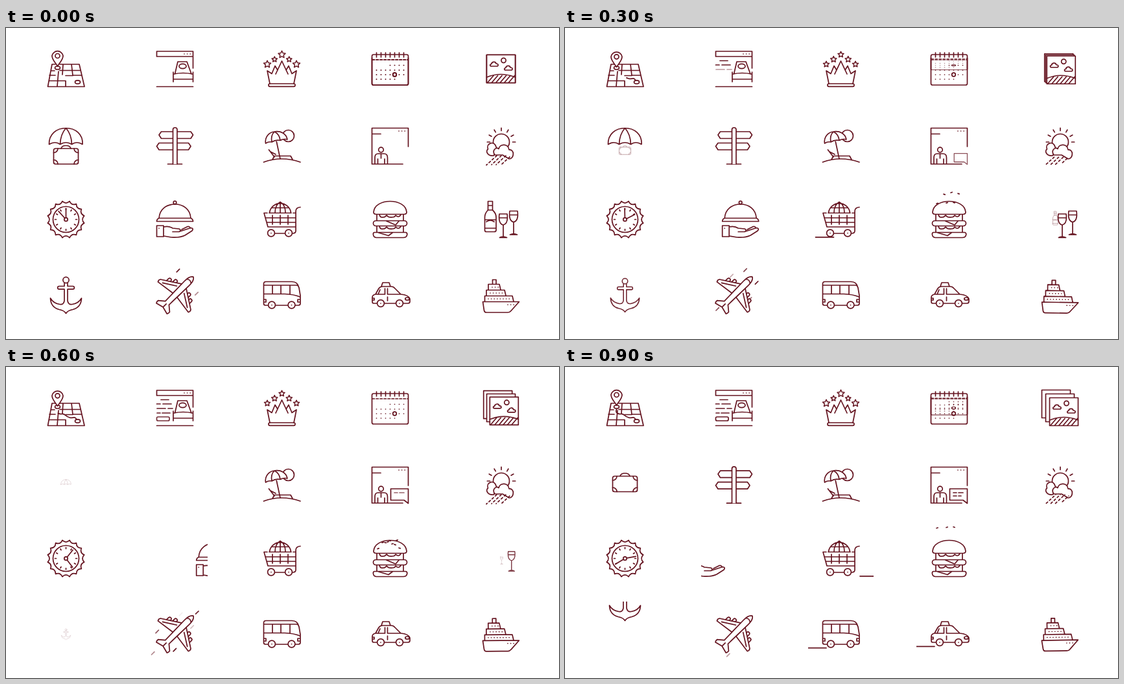
Write an HTML page that moves like this. It is 853x480 px and loops after 960 ms.

```html
<!DOCTYPE html>
<html lang="en">
<head>
<meta charset="utf-8">
<title>Travel icons</title>
<style>
  html, body { margin: 0; width: 100%; height: 100%; overflow: hidden; background: #fff; }
  #stage { display: block; width: 853px; height: 480px; }
  .ink { fill: none; stroke: #651420; stroke-width: 1.7; stroke-linecap: round; stroke-linejoin: round; }
  .solid { fill: #fff; }
  .dots { stroke-dasharray: 0 4.6; }
  .days { stroke-dasharray: 0 7; }
</style>
</head>
<body>
<svg id="stage" class="ink" viewBox="0 0 853 480">
  <defs>
    <g id="wheel" class="solid"><circle r="5.4"/><path d="M0 0V.1"/></g>
    <path id="cloud" d="M-4 4C-7 4 -7 .5 -4 .5C-4 -3 2 -4 3 0C7 0 7 4 4 4Z"/>
    <path id="glass" d="M761 287H773Q775 302 767 304Q759 302 761 287ZM761 293H773M767 304V323M761.5 323.5Q767 320.5 772.5 323.5Z"/>
    <rect id="photo" class="solid" x="741.5" y="41.5" width="44" height="43"/>
    <path id="dash" d="M0 0H28"/>
    <g id="wing">
      <path d="M25 -3V-9A2.5 2.5 0 0 0 20 -9V-6M17 -8V-14A2.5 2.5 0 0 0 12 -14V-11"/>
      <path d="M4.5 -18L33 .5Q35 3 33 6L4.5 2ZM8 -10L27 2"/>
    </g>
  </defs>

  <!-- map -->
  <path d="M76 56H71L64.5 90.5H121L113 56H83M69 66H75M83 65.5H115M67 73H76M88 56L87 72M101 56L103 73H117M81 67L79 90M66 81.5H92V90M92 73.5H103"/>
  <ellipse cx="79.5" cy="61.5" rx="4" ry="2.5"/>
  <path id="route" stroke-linecap="butt" pathLength="1" stroke-dasharray="1 2" d="M109 81C106 75 103 80 98 78C91 76 92 72 86 72.5C80 73 77 69 80 64.5"/>
  <ellipse class="solid" cx="110.5" cy="83.5" rx="4" ry="2.6"/>
  <g id="pin" class="solid"><path d="M79.5 59C76 53 71 49 71 43A8.6 8.6 0 0 1 88 43C88 49 83 53 79.5 59Z"/><circle cx="79.5" cy="43" r="3.5"/></g>

  <!-- hotel page -->
  <path d="M232.5 44V36H288.5V62M232.5 44H288.5M232.5 90.5H288.5"/>
  <path class="dots" d="M275 40H285"/>
  <path d="M258 68V83M288.5 68V83M258 79H288.5M260.5 71L265 52H279L286 71M259 71Q273 68 288 71"/>
  <ellipse cx="272.5" cy="59" rx="5.5" ry="3.6"/>
  <g id="copy">
    <path d="M239 50.5H251"/>
    <path d="M232.5 57H238M242 57H255"/>
    <path d="M233 64H246M250 64H257"/>
    <path d="M233 71H238M241 71H253"/>
    <rect x="232.5" y="77" width="19.5" height="6" rx="2"/>
  </g>

  <!-- crown -->
  <path d="M407 86L403 66L410 70.5L415 58.5L419 65M416 71L425.5 51L435 71M432 65L436 58.5L441 70.5L448 66L444 86"/>
  <rect x="405" y="86" width="41" height="4.3" rx="2"/>
  <g id="stars"></g>

  <!-- calendar -->
  <rect x="564.5" y="41" width="56" height="47" rx="2.5"/>
  <path id="rings"/>
  <g id="page">
    <path d="M565 49H620" stroke-dasharray="3.5 2.5"/>
    <path class="days" d="M592.5 57.5H614M571.5 65H614M571.5 72H593M606.5 72H614M571.5 79H600"/>
    <circle cx="599.5" cy="72" r="2.8"/>
  </g>
  <g id="leaf"><use href="#page"/><path d="M564.5 46V86Q564.5 88 567 88H618Q620.5 88 620.5 86V46"/></g>

  <!-- photos -->
  <use id="back" href="#photo"/>
  <use href="#photo"/>
  <g id="front">
    <use href="#photo"/>
    <circle cx="767.5" cy="50" r="3.6"/>
    <use href="#cloud" x="753" y="55"/><use href="#cloud" x="775" y="61"/>
    <path d="M741.5 76Q763 67 785.5 76"/>
    <path id="hatch"/>
  </g>

  <!-- umbrella and suitcase -->
  <path id="brolly" d="M66.5 179.5C66 164 78 154.5 92.5 154.5S119 164 118 179.5Q109 174 101.5 179.5Q92.5 174 83.5 179.5Q76 174 66.5 179.5ZM83.5 179.5Q84 164 92.5 154.5Q101 164 101.5 179.5"/>
  <g id="bag"><rect x="73.5" y="186" width="38" height="24" rx="3"/><path d="M85 186Q86 181.5 92.5 181.5T100 186M80 186A6.5 6.5 0 0 1 73.5 192.5M105 186A6.5 6.5 0 0 0 111.5 192.5M80 210A6.5 6.5 0 0 0 73.5 203.5M105 210A6.5 6.5 0 0 1 111.5 203.5"/></g>

  <!-- signpost -->
  <svg x="210" y="132" width="101" height="100" viewBox="210 132 101 100"><g id="post">
    <path d="M236 165L239.5 160H285L288.5 165L285 170.5H239.5ZM232.5 182.5L236 177.5H281.5L285 182.5L281.5 188H236ZM249.5 210H271.5"/>
    <path class="solid" d="M257.5 210V157A3.2 3.2 0 0 1 264 157V210"/>
  </g></svg>

  <!-- beach -->
  <circle cx="435.5" cy="166.5" r="9"/>
  <path d="M397.5 207Q425 197 454 207M405.5 188L414 199M408 191L416 195M411 203L414 197.5H439L442 203M417 174L423 202"/>
  <path class="solid" d="M400.5 178C399 169 405 161 414 160C424 158.5 432 163 434 172Q428 170.500 423 173.5Q416 172 410 176Q405 175 400.5 178ZM410 176Q408 166 414 160Q422 164 423 173.5"/>

  <!-- chat page -->
  <path d="M620.5 183V154.5H564.5V210H612M564.5 163.5H578M569 210V200Q569 194 574 194H583Q588.5 194 588.5 200V210M573.5 202V210M584 202V210M578.5 195V201"/>
  <path class="dots" d="M606 159H617"/>
  <circle cx="578.5" cy="188" r="3.8"/>
  <path id="bubble" d="M593.5 205.5V188H620.5V210.5L614 205.5Z"/>
  <g id="chat"><path d="M599 194H604M607 194H614"/><path d="M599 199H604M607 199H611"/></g>

  <!-- weather -->
  <path id="rays"/>
  <circle cx="764" cy="176" r="12.5"/>
  <path class="solid" d="M752 197C743 198 739 190 743.5 187C740 179 751 174 755 181Q760 190 752 197Z"/>
  <path class="solid" d="M754 196C749 189 756 183 760 186.5C762 178 775 178 776 188C785 187 784 202 776 202L766 196Z"/>
  <path id="rain" stroke-dasharray="3 3.6" d="M757 197L741 211.5M764 197L749 211M771 197L756 211M777 199L765 210"/>

  <!-- clock -->
  <path id="badge"/>
  <circle cx="92.5" cy="295.5" r="20"/>
  <path id="ticks"/>
  <path id="hour" d="M92.5 292.5V278.5"/>
  <path id="minute" d="M92.5 292.5V278.5"/>
  <circle class="solid" cx="92.5" cy="295.5" r="2.7"/>

  <!-- room service -->
  <svg x="210" y="245" width="101" height="101" viewBox="210 245 101 101"><g id="serve">
    <g id="dome"><circle cx="260.5" cy="269.5" r="2.3"/><path d="M236 293.5C237 279 248 272 260.5 272S284 279 285 293.5M236 293.5H285Q288.5 295 288.5 298.5H232.5Q232.5 295 236 293.5Z"/></g>
    <path d="M232.5 305H243V322H232.5ZM236 309V309.1M243 307Q251 305 257 309L267 310Q271 312 267 314.5H257M268 314L285 308.5Q290 309 287 313L276 320Q268 324 255 323L243 321M271 311L280 306.5Q284 306 284 309"/>
  </g></svg>

  <!-- cart -->
  <path d="M406.5 285A16.7 17 0 0 1 439.5 285M423 268.5V285M415 285Q415 273 423 268.5Q431 273 431 285M409.5 277.5H436.5M398 285.5H403M406 285.5H440M443 285.5H446M398 285.5L404 307H447M400 293H447M402 300H447M411 289V303M423 289V303M435 289V303M454 276.5Q447 277 447 283V313Q447 317 442 317M414.5 317H430.5"/>
  <use href="#wheel" x="409" y="316.5"/><use href="#wheel" x="436" y="316.5"/>
  <svg x="375" y="245" width="101" height="101" viewBox="375 245 101 101"><use id="cartLine" href="#dash"/></svg>

  <!-- burger -->
  <path d="M567 284C568 273 580 267.5 592.5 267.5S617 273 618 284Q618 287.5 614 287.5H571Q567 287.5 567 284ZM587 298L601 304L606 298M575 316L590 320.5L596 316"/>
  <path id="filling" d="M572 288V297M613 288V297M576 288Q577 293 582 292Q585 292 587 289Q590 293 596 292Q600 292 601 289Q606 294 609 288"/>
  <use href="#filling" y="18"/>
  <rect x="566.5" y="297.5" width="52" height="8" rx="4"/>
  <path d="M568 315.5H617Q620 317 618 321Q617 323.5 613 323.5H571Q567 323 566.5 319Q566 316 568 315.5Z"/>
  <svg x="542" y="245" width="101" height="101" viewBox="542 245 101 101"><g id="seeds"></g></svg>

  <!-- wine -->
  <path id="bottle" d="M743.5 267.5H750.5V281Q756 286 756 292V312Q756 314.5 753 314.5H741Q738.5 314.5 738.5 312V292Q738.5 286 743.5 281ZM743.5 274H750.5M743 281H751M738.5 296H756M738.5 309H756M741 299Q747 295 753 299"/>
  <g id="glass1"><use href="#glass"/></g>
  <g id="glass2"><use href="#glass" x="16" y="-4.5"/></g>

  <!-- anchor -->
  <svg x="42" y="362" width="101" height="101" viewBox="42 362 101 101"><g id="anchor">
    <circle cx="92.5" cy="389" r="4.6"/>
    <path d="M90 393.5V398.5H82A2.3 2.3 0 0 0 82 403.2H90V421Q89 427.500 83 426.5Q73 425 68.5 417Q69 431 82 434.5Q90 436 92.5 440.5Q95 436 103 434.5Q116 431 116.5 417Q112 425 102 426.5Q96 427.5 95 421V403.2H103A2.3 2.3 0 0 0 103 398.5H95V393.5"/>
  </g></svg>

  <!-- plane -->
  <g id="streaks"></g>
  <g class="solid" transform="translate(262 411) rotate(45)">
    <use href="#wing"/><use href="#wing" transform="scale(-1 1)"/>
    <path d="M0 -38C4 -36 5 -30 5 -25L4 19L12.5 26Q13 29 11.5 31L0 28L-11.5 31Q-13 29 -12.5 26L-4 19L-5 -25C-5 -30 -4 -36 0 -38ZM-3.5 -29Q0 -32 3.5 -29M0 21V27"/>
  </g>

  <!-- bus -->
  <path d="M404 428H400Q397.5 428 397.5 425V395Q397.5 391.5 401 391.5H441Q450 391.5 452 401L454 413V425Q454 428 451 428H446M416 428H435M398 410.5H430Q444 411 453.5 415M398 397H448Q451 397 451.5 400M411 397V410M424 397V410M438 397V411M398 419H401V423H398M454 419H450V423H454"/>
  <use href="#wheel" x="410" y="427.5"/><use href="#wheel" x="440.5" y="427.5"/>
  <svg x="375" y="362" width="101" height="101" viewBox="375 362 101 101"><use id="busLine" href="#dash"/></svg>

  <!-- taxi -->
  <path d="M579 399L581 393H591L593 399M572 425H567Q565 425 565 422V416Q565 412 570 411L575 402Q577 399 581 399H594Q598 399 600 402L609 411Q621 412 623 418V422Q623 425 620 425H613M584 425H601M570 411H584M589 411H609M584.5 402V411M588.5 402V411M588.5 415V421M574 411L577 404M565 417H568V420H565"/>
  <ellipse cx="619" cy="418" rx="3.2" ry="2"/>
  <use href="#wheel" x="578" y="425"/><use href="#wheel" x="607" y="425"/>
  <svg x="542" y="362" width="101" height="101" viewBox="542 362 101 101"><use id="taxiLine" href="#dash"/></svg>

  <!-- ship -->
  <g id="ship">
    <path d="M735.5 422.5H791.5L779 436.5Q777 439 774 439H741Q738 439 737.5 436ZM738.5 422V413.5H781L783 422M741 413V404.5H769L771 413M744 404V395.5H761L763 404M750.5 395V388.5H756V395"/>
    <path class="dots" d="M744 418H780M747 409H767M750 400H760M774 427H784"/>
  </g>
</svg>

<script>
const STEP = 60, STEPS = 16, TAU = Math.PI * 2;
const $ = id => document.getElementById(id);
const attr = (el, o) => { for (const n in o) el.setAttribute(n, o[n]); return el; };
const range = (n, f) => Array.from({ length: n }, (_, i) => f(i));
const path = (id, d) => attr($(id), { d });
const add = (id, d) => $(id).appendChild(attr(document.createElementNS('http://www.w3.org/2000/svg', 'path'), { d }));
const polar = (cx, cy, r, deg) => {
  const a = deg * TAU / 360;
  return `${(cx + r * Math.sin(a)).toFixed(2)} ${(cy - r * Math.cos(a)).toFixed(2)} `;
};

const ramp = (k, from, to) => Math.max(0, Math.min(1, (k - from) / (to - from)));
const smooth = p => p * p * (3 - 2 * p);
const easeOut = p => 1 - (1 - p) ** 2;

const shift = (id, x, y) => attr($(id), { transform: `translate(${x} ${y})` });
const turn = (id, deg, x, y) => attr($(id), { transform: `rotate(${deg} ${x} ${y})` });
const fade = (el, opacity) => attr(el, { opacity });
// scale about a point, paler when smaller
const zoom = (id, s, x, y, dy = 0) => attr($(id), {
  transform: `translate(${x} ${y + dy}) scale(${s}) translate(${-x} ${-y})`,
  opacity: s
});

// regular shapes
const spokes = (x, y, r1, r2, n, from, by) =>
  range(n, i => `M${polar(x, y, r1, from + i * by)}L${polar(x, y, r2, from + i * by)}`).join('');
path('rings', range(7, i => `M${571.5 + 7 * i} 38v7`).join(''));
path('hatch', range(6, i => `M${743 + 6.5 * i} 84l9 -10.5`).join(''));
path('rays', spokes(764, 176, 17.5, 21.7, 7, -90, 30));
path('ticks', spokes(92.5, 295.5, 15, 17, 12, 0, 30));
path('badge', 'M' + polar(92.5, 295.5, 28.7, 11.25) + range(16, i =>
  'Q' + polar(92.5, 295.5, 22.8, 22.5 * (i + 1)) + polar(92.5, 295.5, 28.7, 22.5 * (i + 1.5))).join('') + 'Z');

const starShape = 'M' + range(10, i => polar(0, 0, i % 2 ? .48 : 1, i * 36)).join('L') + 'Z';
const stars = range(5, i => ({ x: 403 + 11.25 * i, y: 41 + 7.5 * Math.abs(i - 2), el: add('stars', starShape) }));

const seeds = range(9, i => {
  const x = 574 + (15 + 11 * i) % 37, y = 270 + (x - 592) ** 2 / 70 + i % 3 * 3;
  return { land: 5 + .85 * i, el: add('seeds', `M${x - 1} ${y}l2.2 ${i % 2 ? .7 : -.7}`) };
});

const streaks = [[268, 372], [294, 410], [284, 368], [299, 390], [236, 433], [240, 402], [299, 375], [262, 435]]
  .map(([x, y], i) => ({ born: 1.5 * (i - 1), el: add('streaks', `M${x - 2.2} ${y + 2.2}l4.4 -4.4`) }));

function draw(k) {
  shift('pin', 0, .9 - .9 * Math.cos(TAU * k / 7.5));
  attr($('route'), { 'stroke-dashoffset': 1 - ramp(k, 0, 12) });
  [...$('copy').children].forEach((el, i) => fade(el, ramp(k, 2.1 * i, 2.1 * i + 1.8)));

  stars.forEach(({ x, y, el }, i) => {
    const wave = Math.cos(TAU * k / 15), r = i % 2 ? 4.7 - .3 * wave : 5.1 + .7 * wave;
    attr(el, { transform: `translate(${x} ${y}) scale(${r})`, 'stroke-width': 1.5 / r });
  });

  const fold = 1 - ramp(k % 12, 0, 9);
  attr($('leaf'), { transform: `translate(0 46) scale(1 ${fold}) translate(0 -46)` });

  const gap = 6 * smooth(ramp(k, 0, 14));
  shift('front', gap, gap);
  shift('back', -gap, -gap);

  // shrinking and returning things
  zoom('brolly', 1 - ramp(k, 5.4, 12), 92.5, 182);
  if (k < 10) zoom('bag', 1 - ramp(k, 0, 9.5), 92.5, 182);
  else zoom('bag', ramp(k, 12, 15), 92.5, 182, -17.5);
  zoom('bottle', 1 - ramp(k, 0, 9), 763.5, 295.5);
  zoom('glass1', 1 - ramp(k, 5.4, 12), 763.5, 295.5);
  zoom('glass2', 1 - ramp(k, 9, 15), 763.5, 295.5);
  if (k < 11) zoom('anchor', 1 - ramp(k, 4.4, 12.4), 92.5, 412.5);
  else zoom('anchor', 1, 92.5, 412.5, 8 * (k - 12) - 73);

  shift('post', 0, k < 11 ? -12.5 * Math.max(0, k - 7) ** 2 : 45 * .25 ** (k - 11));

  zoom('bubble', easeOut(ramp(k, 1, 9)), 620.5, 210.5);
  [...$('chat').children].forEach((el, i) => fade(el, ramp(k, 8 + 3 * i, 11 + 3 * i)));
  attr($('rain'), { 'stroke-dashoffset': -2 * k });

  turn('hour', 8.1 * k - 42, 92.5, 295.5);
  turn('minute', 11 * k + .33 * k * k, 92.5, 295.5);

  shift('serve', k < 11 ? 10.2 * Math.max(0, k - 4) : 11 * (k - 11) - 86, 0);
  fade($('dome'), k < 11 ? 1 : 0);

  shift('cartLine', k < 10 ? 334 + 6 * k + .9 * k * k : 383 + 24 * (k - 12), 322.8);
  const pass = 375 + 52 * ((k - 3) % 4);
  shift('busLine', pass, 433.7);
  shift('taxiLine', pass + 167, 431.3);

  // seeds drop at constant speed, the next shower begins near the end
  for (const { land, el } of seeds) {
    const left = Math.max(0, (k < 13 ? land : land + 14) - k);
    attr(el, { transform: `translate(0 ${-5.6 * left})` });
  }

  for (const { born, el } of streaks) {
    const age = k - born;
    attr(el, { transform: `translate(${-1.7 * age} ${1.6 * age})` });
    fade(el, ramp(age, -1, 1) * (1 - ramp(age, 2, 9)));
  }

  const swell = Math.sin(TAU * k / 18);
  attr($('ship'), { transform: `translate(0 ${swell}) rotate(${swell} 763.5 432)` });
}

const start = performance.now();
let last = -1;
function tick() {
  const k = Math.floor((performance.now() - start) / STEP) % STEPS;
  if (k !== last) draw(last = k);
  requestAnimationFrame(tick);
}
tick();
</script>
</body>
</html>
```
